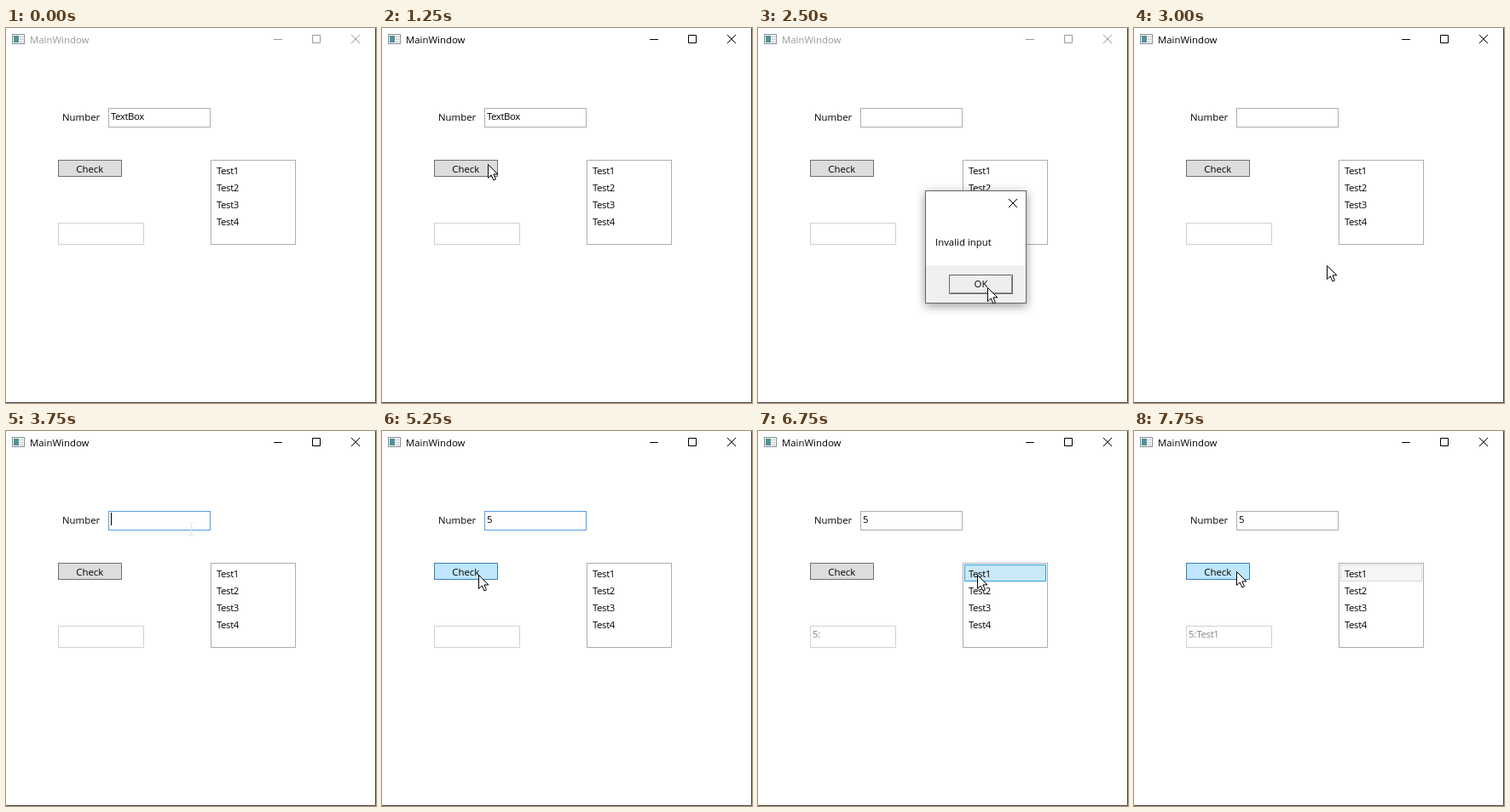
Recreate the animation shown at these times as an HTML page. Size 434 px wide and 441 px high, loop 8000 ms.

```html
<!DOCTYPE html>
<html lang="en">
<head>
<meta charset="utf-8">
<title>MainWindow</title>
<style>
html, body { margin: 0; width: 100%; height: 100%; overflow: hidden; background: #fff; }
svg { display: block; width: 434px; height: 441px; }
text { font: 11.4px "Open Sans", "Noto Sans", sans-serif; fill: #000; }
.tight { letter-spacing: -.4px; }
.mid { text-anchor: middle; }
.box { fill: #fff; stroke: #abadb3; }

/* Every change is a hard one on a 250 ms grid (3.125 %) */
.anim { animation: 8s step-end infinite; }
.hid { visibility: hidden; }

#bar { color: #999; animation-name: bar; }
#bar text { fill: currentColor; }
#bar .ctl { fill: none; stroke: currentColor; }
@keyframes bar {
  12.5% { color: #000; }
  21.875% { color: #999; }
  34.375% { color: #000; }
}

#check { fill: #ddd; stroke: #707070; animation-name: check; }
@keyframes check {
  18.75%, 93.75% { fill: #c4e5f6; stroke: #2c628b; }
  21.875%, 75% { fill: #ddd; stroke: #707070; }
  65.625%, 90.625%, 96.875% { fill: #bee6fd; stroke: #3c7fb1; }
}

#field { animation-name: field; }
@keyframes field {
  43.75% { stroke: #7eb4ea; }
  46.875% { stroke: #569de5; }
  68.75% { stroke: #abadb3; }
}

#hint { animation-name: hint; }
@keyframes hint { 21.875% { visibility: hidden; } }

#typed { animation-name: typed; }
@keyframes typed { 59.375% { visibility: visible; } }

#caret { animation-name: caret; }
@keyframes caret {
  46.875% { visibility: visible; }
  53.125% { visibility: hidden; }
  59.375% { visibility: visible; transform: translateX(7px); }
  62.5% { visibility: hidden; }
}

#beam { animation-name: beam; }
@keyframes beam {
  43.75% { visibility: visible; }
  62.5% { visibility: hidden; }
}

#dialog { filter: drop-shadow(0 3px 6px rgba(0, 0, 0, .4)); animation-name: dialog; }
@keyframes dialog {
  21.875% { visibility: visible; }
  34.375% { visibility: hidden; }
}

#first { fill: none; stroke: none; animation-name: first; }
@keyframes first {
  81.25% { fill: #e5f3fb; stroke: #70c0e7; }
  84.375% { fill: #cbe8f6; stroke: #26a0da; }
  93.75% { fill: #f6f6f6; stroke: #dadada; }
}

#result text { fill: #838383; }
#count { animation-name: count; }
@keyframes count { 68.75% { visibility: visible; } }
#pick { animation-name: pick; }
@keyframes pick { 93.75% { visibility: visible; } }

#arrow { animation-name: arrow; }
@keyframes arrow {
  9.375% { visibility: visible; transform: translate(222px, 205px); }
  12.5% { visibility: visible; transform: translate(160px, 176px); }
  15.625% { visibility: visible; transform: translate(124px, 160px); }
  25% { visibility: visible; transform: translate(176px, 214px); }
  28.125% { visibility: visible; transform: translate(238px, 276px); }
  31.25% { visibility: visible; transform: translate(269px, 305px); }
  37.5% { visibility: visible; transform: translate(226px, 279px); }
  40.625% { visibility: visible; transform: translate(224px, 196px); }
  43.75% { visibility: hidden; }
  62.5% { visibility: visible; transform: translate(168px, 140px); }
  65.625% { visibility: visible; transform: translate(113px, 169px); }
  75% { visibility: visible; transform: translate(142px, 174px); }
  78.125% { visibility: visible; transform: translate(194px, 173px); }
  81.25% { visibility: visible; transform: translate(246px, 170px); }
  84.375% { visibility: visible; transform: translate(257px, 169px); }
  87.5% { visibility: visible; transform: translate(196px, 168px); }
  90.625%, 100% { visibility: visible; transform: translate(120px, 165px); }
}
</style>
</head>
<body>
<svg viewBox="0 0 434 441">
  <rect width="434" height="441" fill="#fff"/>
  <path d="M433.5 0V440.5H0" fill="none" stroke="#444"/>

  <g id="icon">
    <rect x="7.5" y="7.5" width="14" height="11" fill="#f4f4f4" stroke="#8a8f94"/>
    <rect x="9" y="9" width="6" height="8" fill="#4f9298"/>
    <path d="M16 10.5h4M16 13.5h4M16 16.5h4" stroke="#c4c8cc"/>
  </g>
  <g id="bar" class="anim">
    <text x="28" y="18">MainWindow</text>
    <path class="ctl" d="M314 13.5h10M359.5 8.5h9v9h-9z"/>
    <path class="ctl" d="M405 8l10 10M415 8l-10 10"/>
  </g>

  <text x="66" y="109">Number</text>
  <rect id="field" class="box anim" x="120.5" y="94.5" width="119" height="22"/>
  <text id="hint" class="tight anim" x="123" y="108">TextBox</text>
  <text id="typed" class="hid anim" x="123" y="108">5</text>
  <path id="caret" class="hid anim" d="M123.5 96v15" stroke="#000"/>
  <path id="beam" class="hid anim" d="M215 107.5h2l.5 .5 .5-.5h2M217.5 108v14M215 122.5h5" fill="none" stroke="#e4e8ec"/>

  <rect id="check" class="anim" x="61.5" y="155.5" width="74" height="19"/>
  <text class="mid" x="98.3" y="170">Check</text>

  <g id="result">
    <rect x="61.5" y="229.5" width="100" height="25" fill="#fff" stroke="#d0d1d4"/>
    <text id="count" class="hid anim" x="64" y="243">5:</text>
    <text id="pick" class="tight hid anim" x="73.5" y="243">Test1</text>
  </g>

  <rect class="box" x="240.5" y="155.5" width="99" height="99"/>
  <rect id="first" class="anim" x="242.5" y="157.5" width="95" height="19"/>
  <g class="tight">
    <text x="247" y="172">Test1</text>
    <text x="247" y="192">Test2</text>
    <text x="247" y="212">Test3</text>
    <text x="247" y="232">Test4</text>
  </g>

  <g id="dialog" class="hid anim">
    <rect x="196.5" y="191.5" width="118" height="132" fill="#fff" stroke="#666"/>
    <rect x="197" y="279" width="117" height="44" fill="#f0f0f0"/>
    <path d="M294 201l10 10M304 201l-10 10" stroke="#000"/>
    <text x="208" y="256">Invalid input</text>
    <rect x="224.5" y="290.5" width="74" height="22" fill="#eee" stroke="#666"/>
    <path d="M226 311.5h71.5V292" fill="none" stroke="#8a8a8a"/>
    <text class="mid" x="261.5" y="305">OK</text>
  </g>

  <path id="arrow" class="hid anim" d="M.5 .5v16l3.7-3.6 2.7 6.1 2.6-1.1-2.6-6h5z" fill="#fff" stroke="#000"/>
</svg>
</body>
</html>
```
